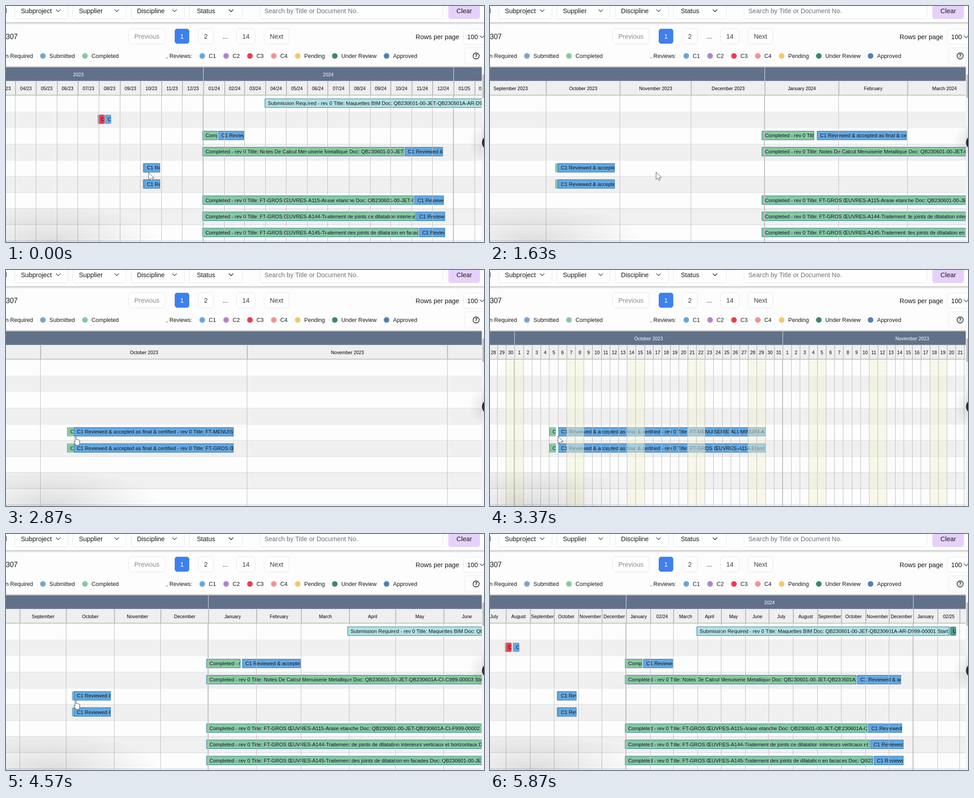
Animation of 1062x527 px, one loop 5.91 s. Source, as an HTML page with a canvas:

```html
<!DOCTYPE html>
<html lang="en">
<head>
<meta charset="utf-8">
<title>Document schedule</title>
<style>
  html, body { margin: 0; width: 100%; height: 100%; overflow: hidden; background: #fdfdfd; }
  canvas, svg { position: absolute; left: 0; top: 0; width: 1062px; height: 527px; }
  svg { font: 14.4px "Liberation Sans", Arial, sans-serif; fill: #18181b; }
  .box { fill: #fefefe; stroke: #e7e7ea; }
  .chev { fill: none; stroke: #52525b; stroke-width: 1.3; stroke-linecap: round; stroke-linejoin: round; }
  .mid { text-anchor: middle; }
  .end { text-anchor: end; }
  .legend { font-size: 12.5px; }
  .cursor { fill: #fff; stroke: #4b4b55; stroke-width: 1; stroke-linejoin: round; }
</style>
</head>
<body>
<canvas id="chart"></canvas>
<svg viewBox="0 0 1062 527">
  <defs>
    <linearGradient id="under" x2="0" y2="1">
      <stop offset="0" stop-color="#b9b9b9"/><stop offset=".3" stop-color="#dedede"/>
      <stop offset="1" stop-color="#fdfdfd" stop-opacity="0"/>
    </linearGradient>
    <radialGradient id="glow">
      <stop offset="0" stop-color="#000" stop-opacity=".13"/>
      <stop offset=".5" stop-color="#000" stop-opacity=".06"/>
      <stop offset="1" stop-color="#000" stop-opacity="0"/>
    </radialGradient>
  </defs>

  <rect y="36.5" width="1062" height="7" fill="url(#under)"/>
  <text x="2" y="15.5" class="end">l</text>
  <g id="filters"></g>
  <rect class="box" x="564.5" y="-9.5" width="406" height="38" rx="5"/>
  <text x="574" y="15.5" fill="#71717a">Search by Title or Document No.</text>
  <rect x="983" y="-10" width="70" height="39" rx="5" fill="#e6d1fa"/>
  <text x="1018" y="15.5" class="mid">Clear</text>

  <text x="26" y="74.3" class="end" font-size="15.8">307</text>
  <g id="pages"></g>
  <text x="910" y="74">Rows per page</text>
  <rect class="box" x="1016.5" y="51.5" width="60" height="34" rx="5"/>
  <text x="1024.5" y="74">100</text>
  <path class="chev" d="M1053 66.5l4.5 4.5 4.5-4.5"/>

  <g class="legend" id="legend">
    <text x="60" y="115.5" class="end">Submission Required</text>
    <text x="356" y="115.5">, Reviews:</text>
  </g>
  <rect class="box" x="1019.5" y="93.5" width="60" height="36" rx="6"/>
  <circle cx="1044.5" cy="111.5" r="6.8" fill="none" stroke="#18181b" stroke-width="1.4"/>
  <text x="1044.5" y="115.2" class="mid" font-size="10.5" font-weight="bold">?</text>

  <rect x="1057" y="135" width="5" height="392" fill="#f4f4f4"/>
  <rect x="1058.5" y="153" width="4" height="52" fill="#bdbdbd"/>
  <ellipse cx="95" cy="527" rx="250" ry="82" fill="url(#glow)"/>
  <circle cx="1074" cy="305" r="46" fill="url(#glow)"/>
  <circle cx="1074" cy="305" r="16.5" fill="#2b2b2e"/>

  <path id="arrow" class="cursor" d="M0 0V16.5L3.8 13.2 6.2 18.6 9 17.4 6.6 12.2H11.8Z"/>
  <path id="hand" class="cursor" d="M2.4 1.8C2.4-.2 5-.2 5 1.8V8c.4-1.2 2.7-1 2.7.5.5-1.1 2.6-.9 2.6.7.6-1 2.4-.7 2.4 1V15c0 3-1.4 3.6-1.4 5.6H4.4c0-2-3.6-4.7-4.6-7.6-.5-1.4 1.1-2 2-.9l.6.8Z"/>
</svg>

<script>
const $ = id => document.getElementById(id);
const add = (id, html) => $(id).insertAdjacentHTML('beforeend', html);

// Toolbar, pagination and legend
[['Subproject', 19, 33, 116], ['Supplier', 148, 162, 246], ['Discipline', 278, 291, 374.5], ['Status', 407, 424, 500]]
  .forEach(([name, x, tx, cx]) => add('filters',
    `<rect class="box" x="${x + .5}" y="-9.5" width="118" height="38" rx="5"/>
     <text x="${tx}" y="15.5">${name}</text>
     <path class="chev" ${name === 'Status' ? 'style="stroke:#18181b"' : ''} d="M${cx - 4.5} 8.2l4.5 4.5 4.5-4.5"/>`));

[['Previous', 272, 82, '#8b8b93'], ['1', 374, 34, '#fff'], ['2', 427, 34, '#3f3f46'], ['14', 512, 42, '#3f3f46'], ['Next', 573, 56, '#3f3f46']]
  .forEach(([name, x, w, ink]) => add('pages',
    `<rect class="box" x="${x + .5}" y="50.5" width="${w - 1}" height="34" rx="6"
       ${name === '1' ? 'style="fill:#3d80f0"' : ''}/>
     <text class="mid" x="${x + w / 2}" y="72.5" fill="${ink}">${name}</text>`));
add('pages', '<text class="mid" x="487" y="72.5">...</text>');

const GREEN = '#86c9a2', BLUE = '#64a7e0', RED = '#ef3a50', TEAL = '#b2e2e2', PINE = '#4a9a84';
[['Submitted', 82, '#7aa6cf'], ['Completed', 175.5, GREEN], ['C1', 436, BLUE], ['C2', 489, '#b184d0'], ['C3', 542, RED],
 ['C4', 595, '#f59393'], ['Pending', 648, '#f6c768'], ['Under Review', 730.5, '#3b8870'], ['Approved', 845.5, '#4f82b6']]
  .forEach(([name, x, c]) => add('legend',
    `<circle cx="${x}" cy="111.5" r="6.2" fill="${c}"/><text x="${x + 14.6}" y="115.5">${name}</text>`));

// Schedule: start and end are days from 1 January 2024
const DOC = 'QB230601-00-JET-QB230601A-';
const done = title => 'Completed - rev 0 Title: ' + title;
const okay = title => 'C1 Reviewed & accepted as final & certified - rev 0 Title: ' + title;
const A115 = `FT-GROS ŒUVRES-A115-Arase etanche Doc: ${DOC}CI-F999-00002`;
const A144 = `FT-GROS ŒUVRES-A144-Traitement de joints de dilatation interieurs verticaux et horizontaux Doc: ${DOC}CI-F999-00003`;
const A145 = `FT-GROS ŒUVRES-A145-Traitement des joints de dilatation en facades Doc: ${DOC}CI-F999-00004`;
const NOTES = `Notes De Calcul Menuiserie Metallique Doc: ${DOC}CI-C999-00003 Start: 31/12/2023`;
const ALU = 'FT-MENUISERIE ALUMINUIM-A113-Chassis', SEAL = 'FT-GROS ŒUVRES-A114-Etancheite';
const rows = [
  [[90, 412, TEAL, `Submission Required - rev 0 Title: Maquettes BIM Doc: ${DOC}AR-D999-00001 Start: 31/03/2024`],
   [412.6, 412.8, PINE, 'Under Review']],
  [[-154, -153.8, RED, 'C3 Rejected'], [-144.1, -143.9, BLUE, okay(ALU)]],
  [[-1.2, 20.9, GREEN, done(NOTES)], [22, 59.8, BLUE, okay(NOTES)]],
  [[-1.2, 293.8, GREEN, done(NOTES)], [294.8, 350.6, BLUE, okay(NOTES)]],
  [[-87.96, -87.9, GREEN, done(ALU)], [-86.97, -63, BLUE, okay(ALU)]],
  [[-87.96, -87.9, GREEN, done(SEAL)], [-86.97, -63, BLUE, okay(SEAL)]],
  [[-1.2, 307.9, GREEN, done(A115)], [308.8, 352, BLUE, okay(A115)]],
  [[-1.2, 310.9, GREEN, done(A144)], [311.6, 353.8, BLUE, okay(A144)]],
  [[-1.2, 314.9, GREEN, done(A145)], [315.8, 353.8, BLUE, okay(A145)]]
];

const W = 1057, TOP = 200, ROW = 36.1, LOOP = 5910;
const FONT = 'px "Liberation Sans", Arial, sans-serif';
const MONTHS = 'January February March April May June July August September October November December'.split(' ');
const DAY = 864e5, EPOCH = Date.UTC(2024, 0, 1);
const dayOf = (y, m) => (Date.UTC(y, m, 1) - EPOCH) / DAY;

const canvas = $('chart'), ctx = canvas.getContext('2d');
const dpr = window.devicePixelRatio || 1;
canvas.width = 1062 * dpr;
canvas.height = 527 * dpr;

// [time, pixels per day, x of 1 January 2024]
const zoom = [
  [0, 1.519, 438], [1080, 1.519, 438], [1630, 5.282, 610], [2330, 5.282, 610], [2870, 14.806, 1438.2],
  [3150, 19.21, 1821.8], [3920, 19.21, 1821.8], [4570, 3.44, 449.5], [5300, 1.743, 302], [LOOP, 1.743, 302]
];
// [time, x, y]
const path = [[0, 317, 372], [300, 317, 372], [800, 369, 371], [1700, 369, 371], [2250, 151, 371], [LOOP, 151, 371]];

function span(keys, t) {
  let i = 0;
  while (i < keys.length - 2 && t >= keys[i + 1][0]) i++;
  const a = keys[i], b = keys[i + 1];
  return [a, b, (t - a[0]) / (b[0] - a[0])];
}

// The scale grows exponentially; a fixed point keeps x linear in the scale
function viewAt(t) {
  const [a, b, k] = span(zoom, t);
  const ppd = a[1] * (b[1] / a[1]) ** k;
  const f = a[1] === b[1] ? 0 : (ppd - a[1]) / (b[1] - a[1]);
  return { ppd, x0: a[2] + (b[2] - a[2]) * f };
}

function rect(x, y, w, h, c) {
  ctx.fillStyle = c;
  ctx.fillRect(x, y, w, h);
}

function label(s, x, y, c, size = 10.3) {
  ctx.font = size + FONT;
  ctx.textAlign = 'center';
  ctx.fillStyle = c;
  ctx.fillText(s, x, y);
}

function monthLabel(y, m, w) {
  if (w >= 155) return MONTHS[m] + ' ' + y;
  if (w >= 51.5) return MONTHS[m];
  return String(m + 1).padStart(2, '0') + '/' + (y % 100);
}

function bar(x, y, w, c, s) {
  const slim = w < 14, right = slim ? x + 14.5 : x + w;
  if (right < 0 || x > W) return;
  ctx.save();
  if (slim) {
    ctx.fillStyle = c;
    ctx.beginPath();
    ctx.roundRect(x + 1.5, y, 13, 20.5, 2.5);
    ctx.fill();
    rect(x, y, Math.max(1, w), 20.5, '#2b73a6');
  } else {
    rect(x, y, w, 20.5, '#2b73a6');
    rect(x + 1, y + 1, w - 2, 18.5, c);
  }
  ctx.beginPath();
  ctx.rect(x, y, right - x - 1, 20.5);
  ctx.clip();
  ctx.font = 11.35 + FONT;
  ctx.textAlign = 'left';
  ctx.fillStyle = '#10151c';
  ctx.fillText(s, x + 7, y + 14.3);
  ctx.restore();
}

function drawChart({ ppd, x0 }) {
  const X = d => x0 + d * ppd, daily = ppd >= 17;
  ctx.setTransform(dpr, 0, 0, dpr, 0, 0);
  ctx.clearRect(0, 0, 1062, 527);
  ctx.save();
  ctx.beginPath();
  ctx.rect(0, 134, W, 393);
  ctx.clip();

  rows.forEach((items, i) => {
    const y = TOP + i * ROW;
    rect(0, y, W, ROW, i % 2 ? '#f0f0f0' : '#fdfdfd');
    rect(0, Math.floor(y + ROW), W, 1, '#c5c5cc');
  });
  rows.forEach((items, i) => items.forEach(([a, b, c, s]) =>
    bar(X(a), TOP + i * ROW + 6.7, (b - a) * ppd, c, s)));

  rect(0, 134.5, W, 2.5, '#c9c9c9');
  rect(0, 137, W, 30.5, '#62718a');
  rect(0, 167.5, W, 31, '#efefef');

  const tick = (d, width, text, first) => {
    const x = Math.round(X(d));
    rect(x - (first ? 1 : 0), TOP, first ? 2 : 1, 327, '#bdbdbd');
    rect(x, 168, daily ? 1.5 : 2, 31, '#b9b9b9');
    label(text, X(d) + width / 2 + 1, 187.5, '#000');
  };
  const group = (d, width, text) => {
    rect(Math.round(X(d)), 137, 1, 30.5, '#e4e7ec');
    label(text, X(d) + width / 2, 156.5, '#fff', 10.5);
  };

  for (let y = 2022; y < 2026; y++) {
    if (!daily) group(dayOf(y, 0), (dayOf(y + 1, 0) - dayOf(y, 0)) * ppd, y);
    for (let m = 0; m < 12; m++) {
      const d = dayOf(y, m), n = dayOf(y, m + 1) - d, w = n * ppd;
      if (X(d) > W || X(d) + w < 0) continue;
      if (!daily) {
        tick(d, w, monthLabel(y, m, w), m === 0);
        continue;
      }
      group(d, w, MONTHS[m] + ' ' + y);
      for (let k = 0; k < n; k++) {
        const weekday = new Date(EPOCH + (d + k) * DAY).getUTCDay();
        if (weekday % 6 === 0) rect(X(d + k), TOP, ppd, 327, 'rgba(242,244,214,.5)');
        tick(d + k, ppd, k + 1, k === 0);
      }
    }
  }
  rect(0, 167, W, 1, '#c4c4c4');
  rect(0, 198.3, W, 1.7, '#b9b9b9');
  ctx.restore();
}

function drawCursor(t) {
  const [a, b, k] = span(path, t), e = k * k * (3 - 2 * k);
  const x = a[1] + (b[1] - a[1]) * e, y = a[2] + (b[2] - a[2]) * e;
  const hand = (t > 2200 && t < 3100) || t > 4150, shown = t < 5450;
  $('arrow').style.display = shown && !hand ? '' : 'none';
  $('hand').style.display = shown && hand ? '' : 'none';
  $(hand ? 'hand' : 'arrow').setAttribute('transform', `translate(${x} ${y})`);
}

function frame() {
  const t = performance.now() % LOOP;
  drawChart(viewAt(t));
  drawCursor(t);
  requestAnimationFrame(frame);
}
frame();
</script>
</body>
</html>
```
